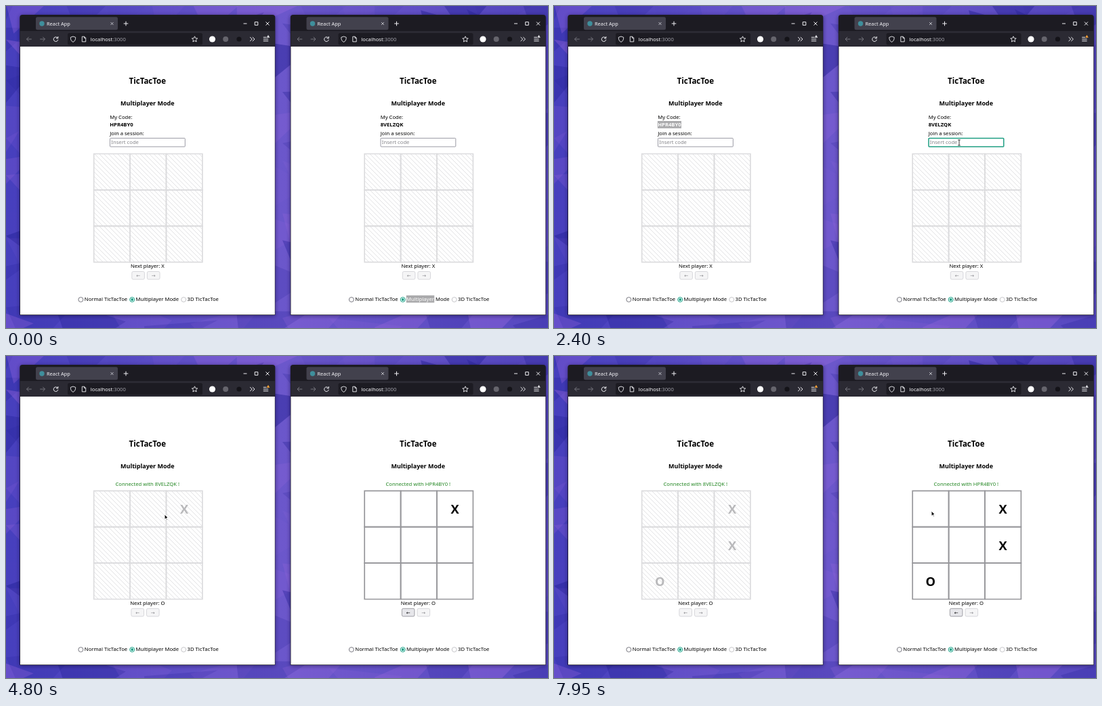
Recreate the animation shown at these times as an HTML page with a canvas. Size 800 px wide and 476 px high, loop 8000 ms.

```html
<!DOCTYPE html>
<html lang="en">
<head>
<meta charset="utf-8">
<title>TicTacToe multiplayer</title>
<style>
  html, body { margin: 0; width: 100%; height: 100%; overflow: hidden; background: #4f45c0; }
  canvas { display: block; width: 800px; height: 476px; }
</style>
</head>
<body>
<canvas id="stage" width="800" height="476"></canvas>
<script>
const ctx = document.getElementById('stage').getContext('2d');
const LOOP = 8000;
const CODES = ['HPR4BY0', '8VELZQK'];
const SELECT = 1200, FOCUS_INPUT = 2150, PASTE = 2450, CONNECT = 2900;
const BASE = 7.68, CELL = 53.4, BOARD_X = 129.7, CENTER_X = 208.8;

const MOVES = [
  { at: 4300, mark: 'X', col: 2, row: 0 },
  { at: 5450, mark: 'O', col: 0, row: 2 },
  { at: 6400, mark: 'X', col: 2, row: 1 }
];

// The pointer rests at each stop and takes TRAVEL ms to reach the next one.
const TRAVEL = 500;
const STOPS = [
  { at: 50, x: 660, y: 338 },
  { at: 1000, x: 166, y: 176, beam: true },
  { at: 2100, x: 598, y: 202, beam: true },
  { at: 3300, x: 625, y: 136, beam: true },
  { at: 4200, x: 262, y: 230 },
  { at: 4800, x: 234, y: 234 },
  { at: 5350, x: 543, y: 307 },
  { at: 6300, x: 262, y: 284 },
  { at: 6950, x: 483, y: 289 },
  { at: 7700, x: 557, y: 229 }
];

const fontOf = (size, weight) => `${weight} ${size}px "Noto Sans", "DejaVu Sans", sans-serif`;

function text(str, x, centerY, { size = BASE, color = '#000', weight = 400, align = 'left' } = {}) {
  ctx.font = fontOf(size, weight);
  ctx.fillStyle = color;
  ctx.textAlign = align;
  ctx.fillText(str, x, centerY + size * 0.34);
  return ctx.measureText(str).width;
}

function paint(shape, fill, stroke, lineWidth) {
  if (fill) { ctx.fillStyle = fill; ctx.fill(shape); }
  if (stroke) { ctx.strokeStyle = stroke; ctx.lineWidth = lineWidth; ctx.stroke(shape); }
}

function box(x, y, w, h, fill, stroke, radius = 0, lineWidth = 0.8) {
  const shape = new Path2D();
  shape.roundRect(x, y, w, h, radius);
  paint(shape, fill, stroke, lineWidth);
}

function disc(x, y, r, fill, stroke, lineWidth = 1) {
  const shape = new Path2D();
  shape.arc(x, y, r, 0, Math.PI * 2);
  paint(shape, fill, stroke, lineWidth);
}

function icon(d, x, y, stroke, fill, lineWidth = 1) {
  ctx.save();
  ctx.translate(x, y);
  paint(new Path2D(d), fill, stroke, lineWidth);
  ctx.restore();
}

// Seeded facets over a soft violet gradient.
function wallpaper() {
  const gradient = ctx.createLinearGradient(0, 0, 800, 0);
  gradient.addColorStop(0, '#463fbd');
  gradient.addColorStop(0.51, '#6b57cb');
  gradient.addColorStop(1, '#5648c0');
  ctx.fillStyle = gradient;
  ctx.fillRect(0, 0, 800, 476);

  let seed = 11;
  const random = () => (seed = seed * 16807 % 2147483647) / 2147483647;
  const step = 68;
  for (let x = -step; x < 800; x += step) {
    for (let y = -step; y < 476; y += step) {
      const tint = random();
      ctx.fillStyle = tint < 0.5 ? `rgba(25,25,140,${0.4 * random()})` : `rgba(165,110,225,${0.35 * random()})`;
      ctx.beginPath();
      ctx.moveTo(x, y + step * random());
      ctx.lineTo(x + step * 1.6, y + step * random());
      ctx.lineTo(x + step * random(), y + step * 1.6);
      ctx.fill();
    }
  }
}

function browser(focused) {
  const light = '#f0f0f4', dim = '#77767f';
  ctx.save();
  ctx.shadowColor = 'rgba(5,0,35,.5)';
  ctx.shadowBlur = 6;
  ctx.shadowOffsetY = 1;
  box(20.3, 13, 377, 444, '#1c1b22', null, [4, 4, 0, 0]);
  ctx.restore();
  box(44, 16.3, 121, 19, '#42414d', null, 2.5);
  disc(53, 26, 3.7, '#3f8f9c');
  text('React App', 60, 26.4, { size: 7.4, color: '#f4f4f8' });
  icon('M-2-2L2 2M2-2L-2 2', 156.5, 26, '#d5d5dc', null, 0.8);
  icon('M-3.3 0H3.3M0-3.3V3.3', 177, 26, light);
  icon('M-2.5 0H2.5', 353, 26, light);
  icon('M-2.3-2.3H2.3V2.3H-2.3Z', 369.5, 26, light);
  icon('M-2.5-2.5L2.5 2.5M2.5-2.5L-2.5 2.5', 386, 26, light);

  box(21, 37, 375.8, 23, '#2b2a33');
  box(91, 40, 199, 17.5, '#1c1b22', null, 2.5);
  icon('M3.8 0H-3.5M-.3-3.2L-3.5 0L-.3 3.2', 34, 49, dim);
  icon('M-3.8 0H3.5M.3-3.2L3.5 0L.3 3.2', 54, 49, dim);
  icon('M2.7-1.8A3.3 3.3 0 1 0 3.3 .7M3.3-4V-1.2H.5', 73.5, 49, light);
  icon('M0-4L3.7-2.7C3.7 1 2.6 3 0 4.3C-2.6 3-3.7 1-3.7-2.7Z', 99, 49, light, null, 0.9);
  icon('M-2.7-3.8H.7L2.7-1.8V3.8H-2.7ZM.5-3.8V-1.6H2.7', 115, 49, light, null, 0.9);
  const hostWidth = text('localhost', 124.8, 49, { color: '#fbfbfe' });
  text(':3000', 124.8 + hostWidth, 49, { color: '#a0a0a8' });
  icon('M0-4.2L1.3-1.4L4.2-1.1L2 .9L2.6 3.9L0 2.4L-2.6 3.9L-2 .9L-4.2-1.1L-1.3-1.4Z', 278.5, 49, light, null, 0.9);
  disc(304.5, 49, 4.6, '#fff');
  disc(324.2, 49, 4, '#66656d');
  disc(344, 49, 3.6, '#141318');
  icon('M-3.2-3L0 0L-3.2 3M.5-3L3.7 0L.5 3', 363.3, 49, light);
  icon('M-3.7-2.7H1M-3.7 0H3.7M-3.7 2.7H3.7', 383.5, 49, light, null, 1.1);
  icon('M0-2.3L2.3 1.8H-2.3Z', 387, 45, null, focused ? '#ffa436' : '#e4e4e8');
  box(21, 60, 375.8, 396.2, '#fff');
}

function hatch(x, y) {
  const step = 4.8 * Math.SQRT2;
  ctx.save();
  ctx.beginPath();
  ctx.rect(x, y, CELL, CELL);
  ctx.clip();
  ctx.strokeStyle = '#cfcfd2';
  ctx.lineWidth = 0.65;
  ctx.beginPath();
  for (let d = -CELL; d < CELL; d += step) {
    ctx.moveTo(x + d, y);
    ctx.lineTo(x + d + CELL, y + CELL);
  }
  ctx.stroke();
  ctx.restore();
}

function board(y, enabled, played) {
  for (let i = 0; i < 9; i++) {
    const cellX = BOARD_X + (i % 3) * CELL, cellY = y + Math.floor(i / 3) * CELL;
    if (!enabled) hatch(cellX, cellY);
    box(cellX, cellY, CELL, CELL, null, enabled ? '#97979b' : '#dcdcde', 0, 1.7);
  }
  for (const { mark, col, row } of played) {
    text(mark, BOARD_X + (col + 0.5) * CELL, y + (row + 0.5) * CELL + 1.2,
      { size: 18.3, weight: 700, align: 'center', color: enabled ? '#000' : '#b9b9bb' });
  }
}

function button(label, x, y, enabled) {
  box(x, y, 18.6, 11.6, enabled ? '#e6e6ea' : '#f5f5f6', enabled ? '#8c8c94' : '#cfcfd3', 2);
  text(label, x + 9.3, y + 6, { size: 7, align: 'center', color: enabled ? '#000' : '#85858a' });
}

function radio(label, x, color, checked) {
  disc(x, 434, 3.5, '#fff', color);
  if (checked) disc(x, 434, 1.9, color);
  text(label, x + 5.4, 433);
}

function highlighted(str, x, y, weight, background) {
  ctx.font = fontOf(BASE, weight);
  box(x - 0.3, y - 5.3, ctx.measureText(str).width + 0.6, 10.8, background);
  text(str, x, y, { weight, color: '#fff' });
}

function joinForm(side, t, focus) {
  const x = 153.2, accent = '#1f9e83';
  text('My Code:', x, 164);
  if (side === 0 && t >= SELECT) {
    highlighted(CODES[side], x, 175.3, 700, focus === 0 ? accent : '#aaaaac');
  } else {
    text(CODES[side], x, 175.3, { weight: 700 });
  }
  text('Join a session:', x, 188.4);
  const active = side === 1 && t >= FOCUS_INPUT;
  box(153.5, 195.4, 110.8, 12.6, '#fff', active ? accent : '#8f8f9a', 1, active ? 1.5 : 0.9);
  if (side === 1 && t >= PASTE) text(CODES[0], 155.3, 201.8);
  else text('Insert code', 155.3, 201.8, { color: '#85858a' });
}

function page(side, t, focus) {
  const connected = t >= CONNECT;
  const played = MOVES.filter(move => t >= move.at);
  const turn = played.length % 2;
  const enabled = connected && turn === side;
  const shift = connected ? 19.2 : 0;
  const boardY = 218.5 - shift;

  ctx.save();
  ctx.translate(side * 399.5, 0);
  browser(focus === side);
  text('TicTacToe', CENTER_X, 110.8 + shift, { size: 11.5, weight: 700, align: 'center' });
  text('Multiplayer Mode', CENTER_X, 144 + shift, { size: 9, weight: 700, align: 'center' });
  if (connected) {
    text(`Connected with ${CODES[1 - side]} !`, CENTER_X, 189, { color: '#228622', align: 'center' });
  } else {
    joinForm(side, t, focus);
  }
  board(boardY, enabled, played);
  text(`Next player: ${'XO'[turn]}`, CENTER_X, boardY + 166.2, { align: 'center' });
  const left = 185.8 - turn * 0.9;
  button('←', left, boardY + 174, enabled && played.length > 0);
  button('→', left + 22.6, boardY + 174, false);

  radio('Normal TicTacToe', 110.4, '#77777f');
  radio('Multiplayer Mode', 186.2, '#14a085', true);
  radio('3D TicTacToe', 262.2, '#c4c4c8');
  if (side === 1 && t < FOCUS_INPUT) highlighted('Multiplayer', 191.6, 433, 400, '#aaaaac');
  ctx.restore();
}

function pointer(t) {
  const index = STOPS.findLastIndex(stop => t >= stop.at);
  if (index < 0) return;
  const from = STOPS[index], to = STOPS[index + 1] || from;
  const p = Math.max(0, 1 - (to.at - t) / TRAVEL) * (to !== from);
  const ease = p * p * (3 - 2 * p);
  const x = from.x + (to.x - from.x) * ease, y = from.y + (to.y - from.y) * ease;
  if (from.beam && p === 0) {
    const beam = 'M-1.8-4H1.8M0-4V4M-1.8 4H1.8';
    icon(beam, x, y, '#fff', null, 2);
    icon(beam, x, y, '#222', null, 0.9);
  } else {
    icon('M0 0V7.6L1.8 6L3 8.7L4.3 8.1L3.1 5.5H5.5Z', x, y, '#fff', '#111');
  }
}

function focusedWindow(t) {
  const played = MOVES.filter(move => t >= move.at).length;
  if (played) return (played - 1) % 2;
  if (t >= FOCUS_INPUT) return 1;
  return t >= SELECT ? 0 : -1;
}

function draw(t) {
  const focus = focusedWindow(t);
  wallpaper();
  page(0, t, focus);
  page(1, t, focus);
  pointer(t);
}

const start = performance.now();
function tick() {
  draw((performance.now() - start) % LOOP);
  requestAnimationFrame(tick);
}
tick();
</script>
</body>
</html>
```
